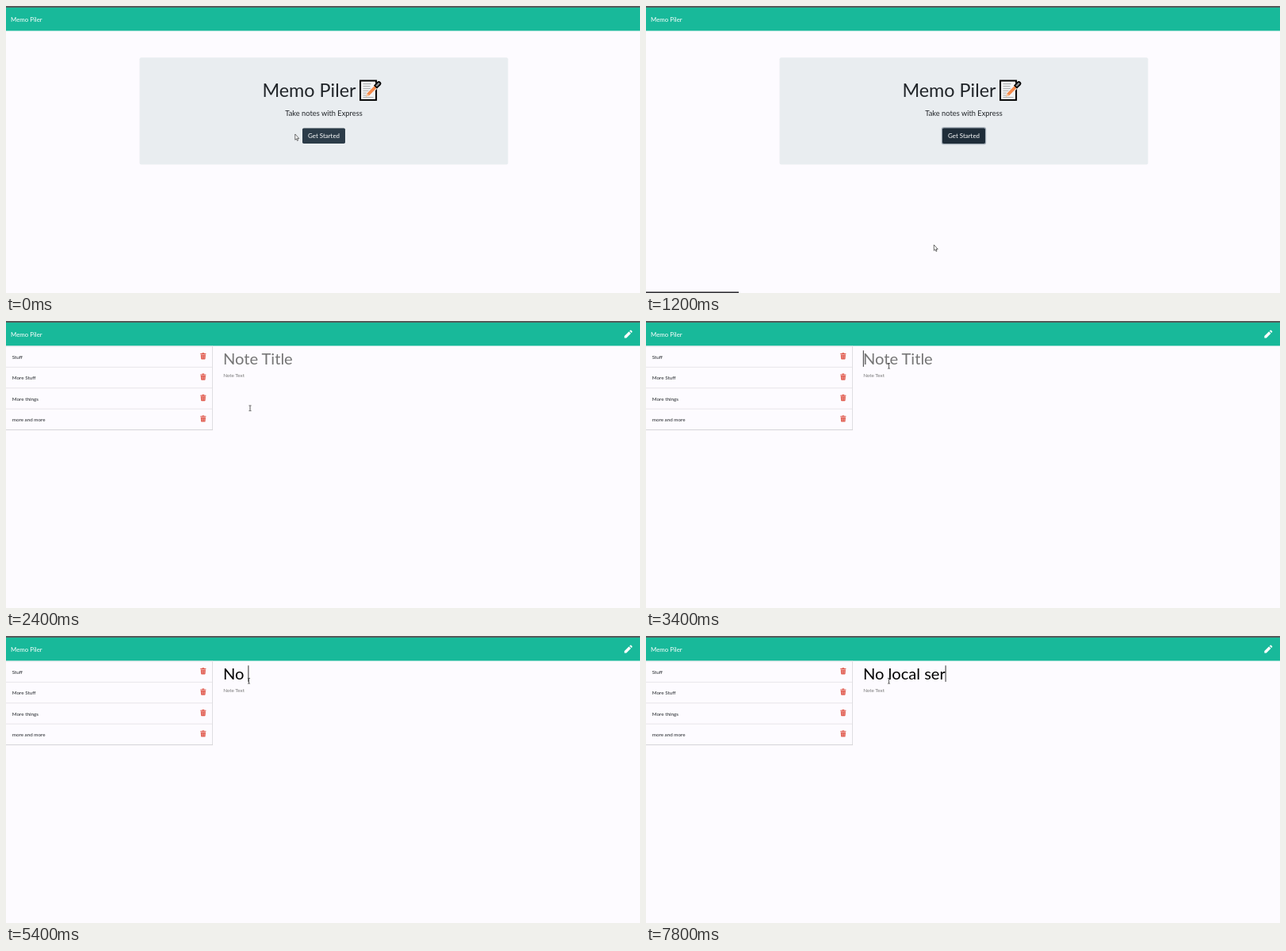
These frames come from a looping animation (800 by 363 pixels, 8000 ms). An HTML page:

```html
<!DOCTYPE html>
<html lang="en">
<head>
<meta charset="utf-8">
<title>Notes app demo</title>
<style>
  html, body { margin: 0; width: 100%; height: 100%; overflow: hidden; background: #fdfbff; }
  svg { display: block; width: 100%; height: 100%; }
  text { font-family: Lato, "Open Sans", sans-serif; fill: #212529; white-space: pre; }
  .small { font-size: 6.28px; }
  .big { font-size: 20.1px; }
  .hint { fill: #757575; }
</style>
</head>
<body>
<svg viewBox="0 0 800 363">
  <defs>
    <g id="trash" fill="#e0584b">
      <path d="M245.2 41h2l.5-.8h2.2l.5.8h2v1h-7.2z"/>
      <path d="M245.7 42.5h6.2l-.4 5.2q-.1.7-.8.7h-3.8q-.7 0-.8-.7z"/>
      <path d="M247.3 43.4v4M248.8 43.4v4M250.3 43.4v4" stroke="#fdfbff" stroke-width=".5" opacity=".6"/>
    </g>
  </defs>

  <rect width="800" height="363" fill="#fdfbff"/>
  <rect width="800" height="31.4" fill="#18b99a"/>
  <rect width="800" height="2" fill="#535a5a"/>
  <text x="6" y="19.5" font-size="7.85" style="fill:#fff">Memo Piler</text>

  <g id="home">
    <rect x="168.5" y="65.3" width="465" height="135.2" rx="2" fill="#e9edf0"/>
    <text x="382.5" y="114.5" font-size="23.4" text-anchor="middle">Memo Piler</text>
    <g id="memo">
      <rect x="447.1" y="94.5" width="20" height="24.4" fill="#f4f4f4" stroke="#000" stroke-width="2"/>
      <path d="M450.5 98.5h10M450.5 101.4h9M450.5 104.3h10M450.5 107.2h8M450.5 110.1h5M450.5 113h4M450.5 115.6h13"
            stroke="#a4a7a9" stroke-width="1"/>
      <path d="M456.5 112.5L470 98.5" stroke="#f4f4f4" stroke-width="6"/>
      <path d="M454.3 114.6l1.3-4.1 11-11.3 2.7 2.7-11 11.3z" fill="#f58a4b"/>
      <path d="M454.3 114.6l1.3-4.1 2.7 2.7z" fill="#f3c9a5"/>
      <path d="M465.2 100.6l3.7-4q1.6-1.3 3 .1t0 3l-3.9 3.7z" fill="#8b8f92" stroke="#000" stroke-width="1.7"/>
    </g>
    <text x="401" y="138.8" font-size="9.3" text-anchor="middle">Take notes with Express</text>
    <rect id="ring" x="372.8" y="153.3" width="56.4" height="21.9" rx="2.6" fill="#9fa9b3"/>
    <rect id="button" x="374" y="154.5" width="54" height="19.5" rx="1.8"/>
    <text x="401" y="167.1" font-size="7.95" text-anchor="middle" style="fill:#fff">Get Started</text>
  </g>

  <g id="notes">
    <path d="M780.3 21.5v-2.5l5.8-5.7 2.4 2.4-5.7 5.8zM786.8 12.6l.9-.9q.6-.5 1.2 0l1.2 1.2q.5.6 0 1.2l-.9.9z" fill="#fff"/>
    <g id="list"></g>
    <path d="M260.5 31.5V138" stroke="#dfdee2"/>
    <path d="M0 137.7H261" stroke="#d3d2d6"/>
    <text id="title" class="big" x="274" y="54.7"></text>
    <text class="small hint" x="274.2" y="71.1">Note Text</text>
    <rect id="caret" y="37.3" width="1" height="20.6" fill="#333"/>
  </g>

  <rect id="status" y="361.4" width="117" height="1.6"/>
  <path id="arrow" d="M0 0V7.3L1.6 5.9 2.7 8.4 3.8 7.9 2.8 5.5H4.9Z" fill="#fff" stroke="#333" stroke-width=".7"/>
  <path id="beam" d="M-1.5-3.3H-.4L0-3 .4-3.3H1.5M0-3V3M-1.5 3.3H-.4L0 3 .4 3.3H1.5" fill="none" stroke="#333" stroke-width=".8"/>
  <path id="hand" d="M0 0Q.8-.8 1.4 0V3L4.6 3.8Q5.2 4 5 5L4.4 8H.6L-1.4 5Q-1.2 4 0 4.8Z" fill="#fff" stroke="#333" stroke-width=".6"/>
</svg>
<script>
const LOOP = 8000, STEP = 200;
const $ = id => document.getElementById(id);
const show = (id, on) => { $(id).style.display = on ? "" : "none"; };

$("list").innerHTML = ["Stuff", "More Stuff", "More things", "more and more"].map((name, i) => `
  <g transform="translate(0 ${i * 26.4})">
    <path d="M0 32H260.5" stroke="#e2e1e5" stroke-width=".8"/>
    <text class="small" x="7.8" y="47.8">${name}</text>
    <use href="#trash"/>
  </g>`).join("");

// [time, pointer shape, x, y]
const pointer = [
  [0, "arrow", 364.8, 162], [200, "hand", 382, 164], [800, "arrow", 376, 205],
  [1000, "arrow", 367, 270], [1200, "arrow", 363.3, 302], [1400, "arrow", 459.8, 208.7],
  [2200, "beam", 380, 156], [2400, "beam", 308, 110.3], [2600, "arrow", 150, 84],
  [2800, "hand", 33, 46], [3000, "arrow", 190, 60], [3200, "beam", 307, 57.2],
  [3400, "beam", 306.5, 56.8]
];

// [time, typed text, caret visible]
const typing = [
  [0, "", false], [3400, "", true], [3800, "", false], [4400, "", true],
  [4600, "N", true], [4800, "No", true], [5200, "No", false], [5400, "No ", true],
  [5800, "No ", false], [6000, "No l", true], [6200, "No lo", true], [6400, "No loc", true],
  [6600, "No local", true], [6800, "No local ", true], [7400, "No local ", false],
  [7600, "No local se", true], [7800, "No local ser", true]
];

const at = (keys, t) => keys.findLast(k => k[0] <= t);

function draw(ms) {
  const t = Math.floor((ms % LOOP) / STEP) * STEP;
  const home = t < 1400;
  show("home", home);
  show("notes", !home);

  const clicked = t >= 600;
  show("ring", clicked);
  $("button").setAttribute("fill", t >= 200 ? "#1f2d39" : "#2c3c49");

  show("status", t >= 200 && t < 1800);
  $("status").setAttribute("fill", home ? "#303034" : t < 1600 ? "#858488" : "#c9c8cc");

  const [, shape, x, y] = at(pointer, t);
  for (const id of ["arrow", "beam", "hand"]) show(id, id === shape);
  $(shape).setAttribute("transform", `translate(${x} ${y})`);

  const [, typed, caret] = at(typing, t);
  const title = $("title");
  title.textContent = typed || "Note Title";
  title.style.fill = typed ? "#000" : "#757575";
  show("caret", caret);
  if (caret) $("caret").setAttribute("x", 273.8 + (typed && title.getComputedTextLength()));
}

function tick(now) {
  draw(now);
  requestAnimationFrame(tick);
}
draw(0);
requestAnimationFrame(tick);
</script>
</body>
</html>
```
